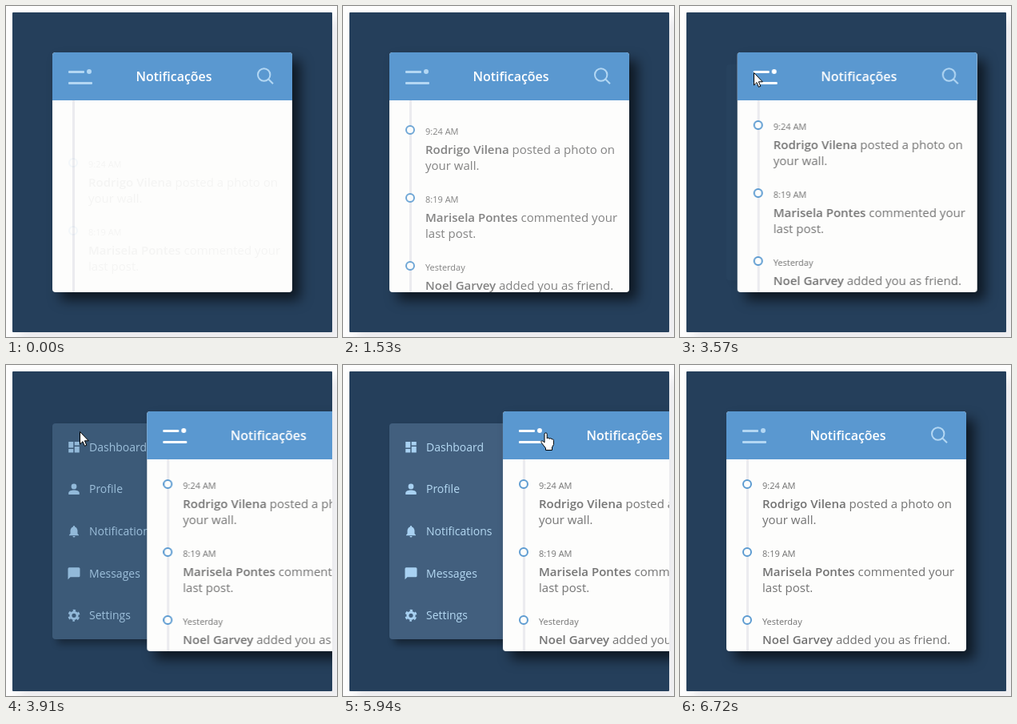
Recreate the animation shown at these times as an HTML page. Size 414 by 414 pixels, loop 7670 ms.

```html
<!DOCTYPE html>
<html lang="pt">
<head>
<meta charset="utf-8">
<title>Notificações</title>
<style>
  html, body { margin: 0; width: 100%; height: 100%; overflow: hidden; background: #fdfdfd; }
  body { position: relative; font-family: "Open Sans", sans-serif; }
  div, svg { position: absolute; display: block; }
  .frame { left: 8px; top: 8px; width: 400px; height: 400px; border-radius: 1px; background: #253f5b;
           box-shadow: 9px 9px 12px #ebebee; }
  .clip { inset: 0; overflow: hidden; }
  .menu { left: 50px; top: 65px; width: 150px; height: 270px; border-radius: 4px; background: #43617f;
          box-shadow: 6px 6px 10px rgba(0, 0, 0, .45); opacity: 0; }
  .card { left: 50px; top: 50px; width: 300px; height: 300px; border-radius: 4px; background: #fdfdfc;
          box-shadow: 10px 10px 15px rgba(0, 0, 0, .62); }
  .card svg { border-radius: 4px; overflow: hidden; }
  .menu text { font-size: 14px; fill: #b9def8; }
  .icon { fill: #acd6f6; stroke: #acd6f6; stroke-width: 0; }
  .title { font-size: 16px; font-weight: 600; fill: #fff; text-anchor: middle; }
  .item { font-size: 15px; fill: #727272; }
  .time { font-size: 11px; }
  .name { font-weight: 600; }
  .burger { fill: #b3d7f3; }
  .cursor { left: 0; top: 0; overflow: visible; }
  .cursor path { fill: #fff; stroke: #000; stroke-linejoin: round; }
</style>
</head>
<body>
<div class="frame"><div class="clip">
  <div class="menu">
    <svg width="150" height="270" viewBox="58 73 150 270">
      <rect id="row" x="58" y="79.67" width="150" height="46" fill="#5a98d0" opacity="0"/>
      <g id="links"></g>
    </svg>
  </div>
  <div class="card" id="card">
    <svg width="300" height="300" viewBox="58 58 300 300">
      <rect x="83" y="118" width="3" height="240" fill="#ebebef"/>
      <g id="items"></g>
      <rect x="58" y="58" width="300" height="60" fill="#5a98d0"/>
      <g class="burger" id="burger">
        <rect x="78" y="81" width="20" height="3" rx="1"/>
        <circle cx="104" cy="82" r="3"/>
        <rect x="78" y="95" width="30" height="3" rx="1"/>
      </g>
      <text class="title" x="210" y="94">Notificações</text>
      <g fill="none" stroke="#b3d7f3" stroke-width="2">
        <circle cx="322.7" cy="86" r="7.7"/>
        <path d="M328.2 91.5L334 97.2"/>
      </g>
    </svg>
  </div>
</div></div>
<svg class="cursor" id="cursor" width="1" height="1">
  <path id="arrow" d="M.5.5V16L4 12.7 6.4 18.3 8.8 17.3 6.4 11.8H11.3Z"/>
  <path id="hand" opacity="0" d="M1 12V1.5a1.6 1.6 0 0 1 3.2 0V7a1.6 1.6 0 0 1 3 .4 1.6 1.6 0 0 1 2.9.6 1.5 1.5 0 0 1 2.3 1.4V14.5L10.5 18V21.5H2.5V19L-2.8 12.2C-4 10.2-2 9-.4 10.6Z"/>
</svg>
<script>
const LOOP = 7670;
const $ = id => document.getElementById(id);

const items = [
  ['9:24 AM', 'Rodrigo Vilena', 'posted a photo on', 'your wall.'],
  ['8:19 AM', 'Marisela Pontes', 'commented your', 'last post.'],
  ['Yesterday', 'Noel Garvey', 'added you as friend.', '']
];
$('items').innerHTML = items.map(([time, name, text, more], i) => `
  <g class="item" transform="translate(0 ${i * 85})">
    <circle cx="84" cy="149" r="5" fill="#fdfdfc" stroke="#5c9bd1" stroke-width="2"/>
    <text class="time" x="103" y="155">${time}</text>
    <text x="103" y="179"><tspan class="name">${name}</tspan> ${text}</text>
    <text x="103" y="199">${more}</text>
  </g>`).join('');

// Icons sit on a 24-unit grid centred on 0,0.
const links = [
  ['Dashboard', '<path d="M-9-9h8V1h-8zM-9 3h8v6h-8zM1-9h8v6H1zM1-1h8V9H1z"/>'],
  ['Profile', '<circle cy="-4.5" r="4.5"/><path d="M-9 9V6C-9 3-4 1.5 0 1.5S9 3 9 6V9Z"/>'],
  ['Notifications', '<path d="M-8 7V6L-6 4V-1C-6-4-4-7-1.5-7.4V-8a1.5 1.5 0 0 1 3 0V-7.4C4-7 6-4 6-1V4L8 6V7ZM-2 8H2a2 2 0 0 1-4 0Z"/>'],
  ['Messages', '<path d="M-10 10V-8a2 2 0 0 1 2-2H8a2 2 0 0 1 2 2V4a2 2 0 0 1-2 2H-6Z"/>'],
  ['Settings', `<g fill="none" transform="rotate(90)"><circle r="5.5" stroke-width="4"/>
    <circle r="8.5" pathLength="12" stroke-width="3" stroke-dasharray="1" stroke-dashoffset=".5"/></g>`]
];
$('links').innerHTML = links.map(([label, shape], i) => {
  const y = 102.67 + i * 52.67;
  return `<g class="icon" transform="translate(85 ${y}) scale(.75)">${shape}</g>
    <text x="104" y="${Math.round(y + 5)}">${label}</text>`;
}).join('');

// Steps are [ms, value, easing]; the first and last values are held to the loop's ends.
function play(el, prop, steps) {
  const all = [[0, steps[0][1]], ...steps, [LOOP, steps[steps.length - 1][1]]];
  el.animate(all.map(([ms, value, easing = 'linear']) => ({ offset: ms / LOOP, [prop]: value, easing })),
    { duration: LOOP, iterations: Infinity });
}
const slide = (x, y) => `translate(${x}px, ${y}px)`;

// The entrance and the opening begin a little way into the standard ease curve.
const enter = 'cubic-bezier(.2, .24, .28, 1)';
const open = 'cubic-bezier(.19, .28, .29, 1)';

play($('items'), 'transform', [[0, slide(0, 47), enter], [2730, slide(0, 0)]]);
play($('items'), 'opacity', [[0, .06, enter], [2730, 1]]);

const drawer = value => [
  [3570, value(0)], [3570, value(.093), open], [4310, value(1)],
  [5912, value(1), 'ease'], [6712, value(0)]
];
play($('card'), 'transform', drawer(p => slide(145 * p, 0)));
play(document.querySelector('.menu'), 'opacity', drawer(p => p));

play($('burger'), 'fill', [
  [2480, '#b3d7f3', 'ease'], [2940, '#ffffff'], [6090, '#ffffff', 'ease'], [6600, '#b3d7f3']
]);
play($('row'), 'opacity', [[4330, 0], [4420, .3], [4480, .3], [4630, 0]]);

const path = [
  [2225, -14, 105], [2280, 10, 95], [2370, 36, 87], [2500, 80, 84, 'ease-out'], [2620, 92, 83],
  [4330, 92, 83, 'ease-in-out'], [4620, 251, 85],
  [6050, 251, 85, 'ease-in'], [6300, 180, 128], [6680, -1, 243], [6720, -24, 257]
];
play($('cursor'), 'transform', path.map(([ms, x, y, easing]) => [ms, slide(x, y), easing]));

const hand = (off, on) => [[4340, off], [4340, on], [6130, on], [6130, off]];
play($('hand'), 'opacity', hand(0, 1));
play($('arrow'), 'opacity', hand(1, 0));
</script>
</body>
</html>
```
